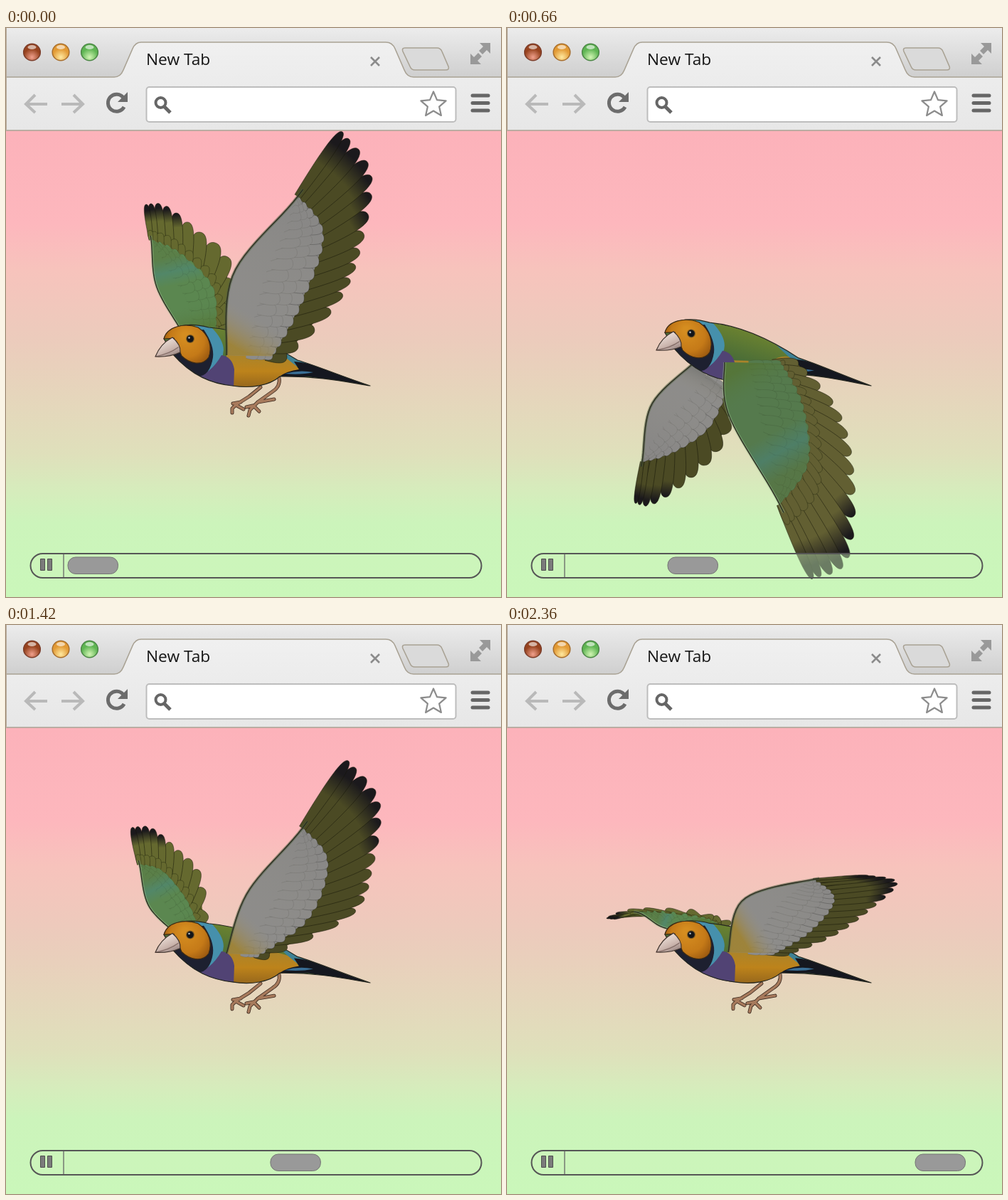
Write an HTML page with a canvas that moves like this. It is 696 by 800 pixels and loops after 2.52 s.

```html
<!DOCTYPE html>
<html lang="en">
<head>
<meta charset="utf-8">
<title>Flying finch</title>
<style>
html, body { margin: 0; width: 100%; height: 100%; overflow: hidden; }
#stage {
  position: relative; width: 696px; height: 800px; overflow: hidden;
  background: linear-gradient(#fcb2ba 143px, #fdb7bd 275px, #f7c3bc 340px, #eccbbc 435px, #dfe0bb 600px, #d6ecbc 650px, #ccf4bb 695px, #caf7ba);
}
canvas, svg { position: absolute; left: 0; top: 0; display: block; }
text { font: 22.7px "Open Sans", "Noto Sans", sans-serif; fill: #161616; }
</style>
</head>
<body>
<div id="stage">
<canvas id="sky" width="696" height="800"></canvas>
<svg width="696" height="800" viewBox="0 0 696 800" fill="none">
  <defs>
    <linearGradient id="bar" x2="0" y2="1"><stop stop-color="#ececec"/><stop offset="1" stop-color="#cfcfcf"/></linearGradient>
    <linearGradient id="tab" x2="0" y2="1"><stop stop-color="#f0f0f0"/><stop offset="1" stop-color="#e7e7e7"/></linearGradient>
    <radialGradient id="red" cy=".8"><stop stop-color="#f0a08c"/><stop offset="1" stop-color="#97431f"/></radialGradient>
    <radialGradient id="amber" cy=".8"><stop stop-color="#ffe9a0"/><stop offset="1" stop-color="#e29a35"/></radialGradient>
    <radialGradient id="green" cy=".8"><stop stop-color="#d2f5b4"/><stop offset="1" stop-color="#5fb553"/></radialGradient>
  </defs>
  <path fill="url(#bar)" d="M0 0H696V69H0z"/>
  <path fill="#e9e9e9" d="M0 69H696V143H0z"/>
  <path fill="url(#tab)" stroke="#a9a294" stroke-width="1.6" d="M-2 69H152Q161 69 165 59L178 29Q182 20 190 20H534Q543 20 547 29L560 59Q564 69 573 69H698V144H-2z"/>
  <path stroke="#b5a896" d="M.5 0V143"/>
  <g stroke-width="1.5">
    <circle cx="36.5" cy="34" r="11.8" fill="url(#red)" stroke="#7c3e2b"/>
    <circle cx="77" cy="34" r="11.8" fill="url(#amber)" stroke="#a86f2e"/>
    <circle cx="117.5" cy="34" r="11.8" fill="url(#green)" stroke="#4c8746"/>
  </g>
  <g fill="#fff" opacity=".6"><ellipse cx="36.5" cy="27" rx="6" ry="3"/><ellipse cx="77" cy="27" rx="6" ry="3"/><ellipse cx="117.5" cy="27" rx="6" ry="3"/></g>
  <text x="197" y="52">New Tab</text>
  <path stroke="#8b8b8b" stroke-width="2.6" d="M513 41l12 12m0-12l-12 12"/>
  <path fill="#dadada" stroke="#a9a294" stroke-width="1.6" d="M561 28H606Q611 28 613 33L622 54Q624 59 618 59H575Q570 59 568 54L558 33Q556 28 561 28z"/>
  <path fill="#999" d="M666 21H681V36L676 31 670 37 665 32 671 26zM653 36V51H668L663 46 669 40 664 35 658 41z"/>
  <g stroke="#b9b9b9" stroke-width="4"><path d="M58 107H29m12-13L28 107l13 12"/><path d="M78 107h29m-12-13l13 13-13 12"/></g>
  <path stroke="#6c6c6c" stroke-width="5" d="M165 98A12 12 0 1 0 166 111"/>
  <path fill="#6c6c6c" d="M171 90V104H157z"/>
  <rect x="197.500" y="83" width="435" height="49" rx="4" fill="#fff" stroke="#bdbdbd" stroke-width="2"/>
  <circle cx="217.500" cy="105" r="7" stroke="#666" stroke-width="4"/>
  <path stroke="#666" stroke-width="5" d="M222 110l9 9"/>
  <path id="star" fill="#fff" stroke="#8c8c8c" stroke-width="2.2" stroke-linejoin="round"/>
  <path stroke="#666" stroke-width="5" stroke-linecap="round" d="M656 95h22M656 105.500h22M656 116h22"/>
  <rect x="34.500" y="739" width="634" height="34" rx="17" fill="#cdf4bb" fill-opacity=".45" stroke="#565656" stroke-width="2"/>
  <path stroke="#666" stroke-width="1.3" d="M81 740V772"/>
  <path fill="#7b7b7b" stroke="#4e4e4e" d="M48.500 746.500h6v16h-6zM58.500 746.500h6v16h-6z"/>
  <rect id="thumb" x="87" y="744" width="70.500" height="23.500" rx="11" fill="#999" stroke="#757575"/>
</svg>
</div>
<script>
const ctx = document.getElementById('sky').getContext('2d');
const thumb = document.getElementById('thumb');
const LOOP = 2520, LAST = 2360, STEP = 20, BEAT = 1223, START = 87, SPEED = 0.2111;

document.getElementById('star').setAttribute('d', 'M' + Array.from({ length: 10 }, (_, i) => {
  const a = i * Math.PI / 5 - Math.PI / 2, r = i % 2 ? 8.5 : 18.5;
  return (601 + r * Math.cos(a)).toFixed(1) + ' ' + (108 + r * Math.sin(a)).toFixed(1);
}).join('L') + 'z');

const slide = [[0, 87], [300, 150], [660, 226], [1160, 316], [1700, 432], [2040, 509], [2360, 574]];
const beats = [0, 300, 412, 660, 777, 930, 1085];
const bob = [[0], [-5], [-7], [-9], [-8], [-5], [-2]];

// Each pose: four points of the leading edge, four of the trailing edge, two of the covert hem.
const nearPoses = [
  [310,460, 320,345, 410,237, 473,146, 513,203, 500,302, 470,380, 395,462, 445,290, 415,385],
  [310,464, 365,446, 428,415, 502,351, 549,383, 538,433, 505,466, 345,467, 461,437, 440,464],
  [308,463, 328,528, 412,570, 502,594, 543,585, 515,552, 478,518, 398,468, 448,545, 425,500],
  [306,470, 312,545, 383,670, 429,775, 478,750, 487,640, 468,545, 410,472, 422,612, 414,530],
  [308,470, 326,560, 372,655, 396,772, 452,745, 483,650, 482,550, 405,470, 407,605, 412,530],
  [309,465, 350,450, 440,470, 505,570, 520,560, 530,520, 490,490, 400,466, 460,490, 435,475],
  [311,460, 332,386, 430,357, 508,351, 549,361, 513,397, 462,434, 397,462, 459,385, 425,430]
];
const farPoses = [
  [243,420, 211,362, 204,298, 197,248, 222,249, 263,280, 314,328, 312,425, 245,318, 290,365],
  [245,466, 190,464, 160,436, 140,402, 158,401, 183,409, 210,418, 250,440, 180,428, 205,442],
  [255,468, 205,487, 170,527, 149,536, 165,536, 220,537, 280,530, 325,505, 205,533, 262,520],
  [260,473, 203,530, 190,610, 181,669, 203,671, 250,640, 300,590, 325,520, 232,597, 283,562],
  [252,472, 195,525, 182,603, 178,683, 199,687, 245,645, 290,582, 328,520, 226,592, 285,545],
  [247,455, 205,470, 160,490, 140,560, 150,565, 190,530, 260,500, 320,470, 195,508, 255,490],
  [240,430, 215,423, 182,403, 150,412, 141,410, 180,399, 260,403, 315,418, 215,404, 275,412]
];

const mix = (a, b, k) => [a[0] + (b[0] - a[0]) * k, a[1] + (b[1] - a[1]) * k];
const clamp = v => Math.min(1, Math.max(0, v));

// Cubic through the keyed poses, wrapping at the end of the wing beat.
function pose(keys, t) {
  const n = beats.length;
  const when = i => beats[(i + n) % n] + Math.floor(i / n) * BEAT;
  const key = i => keys[(i + n) % n];
  let i = n - 1;
  while (beats[i] > t) i--;
  const t0 = when(i), d = when(i + 1) - t0, u = (t - t0) / d;
  return key(i).map((a, c) => {
    const b = key(i + 1)[c];
    const m = (b - key(i - 1)[c]) / (when(i + 1) - when(i - 1)) * d;
    const q = (key(i + 2)[c] - a) / (when(i + 2) - t0) * d;
    return a + u * (m + u * (3 * (b - a) - 2 * m - q + u * (2 * (a - b) + m + q)));
  });
}

// Point at u (0..1) on a smooth curve through pts.
function at(pts, u) {
  const n = pts.length - 1, s = clamp(u) * n, i = Math.min(n - 1, Math.floor(s)), f = s - i;
  const b = pts[i], c = pts[i + 1], a = pts[i - 1] || b, d = pts[i + 2] || c;
  return [0, 1].map(k => b[k] + f / 2 * (c[k] - a[k]
    + f * (2 * a[k] - 5 * b[k] + 4 * c[k] - d[k] + f * (3 * (b[k] - c[k]) + d[k] - a[k]))));
}
const trace = (fn, n = 24) => Array.from({ length: n + 1 }, (_, i) => fn(i / n));

function line(pts) {
  ctx.beginPath();
  pts.forEach(p => ctx.lineTo(p[0], p[1]));
}

function blade(a, b, h, fill, edge) {
  const dx = b[0] - a[0], dy = b[1] - a[1], len = Math.hypot(dx, dy) || 1;
  const side = (p, k) => [p[0] - dy / len * h * k, p[1] + dx / len * h * k];
  const m = mix(a, b, 0.65);
  ctx.beginPath();
  ctx.moveTo(...side(a, -0.6));
  ctx.bezierCurveTo(...side(m, -1.1), ...side(b, -1.1), ...b);
  ctx.bezierCurveTo(...side(b, 1.1), ...side(m, 1.1), ...side(a, 0.6));
  ctx.fillStyle = fill;
  ctx.fill();
  ctx.strokeStyle = edge;
  ctx.stroke();
}

// A row of n blades between two curves, drawn from the body outwards.
function row(n, from, to, paint, edge) {
  for (let i = n - 1; i >= 0; i--) {
    const u = i / (n - 1), a = from(u), b = to(u);
    const u0 = clamp(u - 1 / n), u1 = clamp(u + 1 / n), p = to(u0), q = to(u1);
    const dx = b[0] - a[0], dy = b[1] - a[1], len = Math.hypot(dx, dy) || 1;
    const gap = Math.abs(dx * (q[1] - p[1]) - dy * (q[0] - p[0])) / len / ((u1 - u0) * n);
    blade(a, b, gap * 0.58 + 1.2, paint(u, a, b), edge);
  }
}

function wing(p, top, n, far) {
  const pts = Array.from({ length: 10 }, (_, i) => [p[2 * i], p[2 * i + 1]]);
  const [l0, l1, l2, l3, t1, t2, t3, t4, k1, k2] = pts;
  const end = mix(t4, l0, 0.25);
  const edge = u => at([l0, l1, l2, l3], u);
  const lead = u => edge((1 - u) * 2 / 3);
  const hem = u => at([l2, k1, k2, end], u);
  const tips = u => at([l3, t1, t2, t3, t4], u);
  const quill = top ? (far ? '#65692f' : '#625f32') : '#4b4a24';
  const cover = top ? (far ? '#5b8750' : '#557a4d') : '#8d8c8a';
  ctx.lineWidth = 0.9;

  line([...trace(hem), ...trace(u => mix(hem(1 - u), tips(1 - u), 0.75))]);
  ctx.fillStyle = quill;
  ctx.fill();
  row(n, u => mix(hem(u), lead(u), 0.15), tips, (u, a, b) => {
    if (u > 0.42) return quill;
    const g = ctx.createLinearGradient(...a, ...b);
    g.addColorStop(0.5 + u * 0.5, quill);
    g.addColorStop(0.82 + u * 0.4, '#1b191c');
    return g;
  }, 'rgba(20,20,8,.55)');
  if (top) row(n + 3, hem, u => mix(hem(u), tips(u), 0.27), () => quill, 'rgba(25,30,10,.4)');

  const patch = () => line([...trace(u => edge(u * 2 / 3)), ...trace(hem)]);
  patch();
  ctx.fillStyle = cover;
  ctx.fill();
  for (const r of [0, 0.16, 0.32]) {
    row(n + 2, u => mix(hem(u), lead(u), r + 0.25), u => mix(hem(u), lead(u), r - 0.02),
      () => cover, r || top ? 'rgba(30,35,25,.12)' : 'rgba(30,30,30,.35)');
  }
  const g = ctx.createLinearGradient(...mix(l0, end, 0.5), ...k1);
  if (top) {
    g.addColorStop(0, 'rgba(85,115,45,.6)');
    g.addColorStop(0.3, 'rgba(85,125,75,0)');
    g.addColorStop(0.62, 'rgba(65,135,150,0)');
    g.addColorStop(0.8, 'rgba(65,135,150,.35)');
    g.addColorStop(1, 'rgba(90,110,55,.3)');
  } else {
    g.addColorStop(0, far ? 'rgba(110,110,105,.5)' : 'rgba(160,130,45,.85)');
    g.addColorStop(0.26, 'rgba(150,145,130,0)');
    g.addColorStop(1, 'rgba(120,118,118,.2)');
  }
  patch();
  ctx.fillStyle = g;
  ctx.fill();

  const rim = trace(u => edge(u * 0.7));
  line(rim);
  ctx.lineWidth = 4;
  ctx.strokeStyle = top ? 'rgba(150,190,140,.4)' : 'rgba(75,95,60,.5)';
  ctx.stroke();
  line(rim);
  ctx.lineWidth = 1.4;
  ctx.strokeStyle = '#2b2c20';
  ctx.stroke();
}

const shape = new Path2D('M222 437C228 419 255 413 285 421C330 424 375 445 410 467C440 476 470 489 512 503C480 498 440 489 385 490C370 503 345 507 318 503C290 500 262 490 234 458z');
const chest = [
  ['M268 415L288 420Q313 445 303 464Q290 482 276 497L240 470z', '#4690ac'],
  ['M303 460Q318 462 321 480L320 508L262 493Q288 487 303 460z', '#514374'],
  ['M230 452Q250 480 270 490Q287 489 291 463Q293 446 278 424L240 430z', '#1d2030']
].map(([d, c]) => [new Path2D(d), c]);
const rump = new Path2D('M378 449L410 464L436 475L412 478Q395 466 378 449z');
const tail = new Path2D('M405 469Q425 470 445 479Q480 487 512 503Q470 497 425 490L383 491Q395 482 412 480z');
const tailBlue = new Path2D('M392 486Q412 480 432 484Q415 488 392 486z');
const head = new Path2D('M222 437C226 420 250 414 270 421C287 432 290 450 285 463C276 476 258 472 247 461L236 436z');
const beak = new Path2D('M210 462Q217 444 234 435Q246 445 245 456Q230 463 210 462z');
const mouth = new Path2D('M210 462Q230 458 242 449');
const legs = new Path2D('M358 505L342 518L323 530L318 535V541M323 530L334 536M330 526L319 528M384 492Q386 504 375 511L354 526L343 537L341 545M354 526L377 522M348 531L356 539M347 531L338 533');

function paint(path, fill, edge) {
  ctx.fillStyle = fill;
  ctx.fill(path);
  if (edge) { ctx.strokeStyle = edge; ctx.stroke(path); }
}

function body(dy, under) {
  ctx.save();
  ctx.transform(1, -dy / 300, 0, 1, 0, dy * 512 / 300);
  ctx.lineCap = ctx.lineJoin = 'round';
  for (const [w, c] of [[5, '#3c2a20'], [3.4, '#a77a5c']]) {
    ctx.lineWidth = w;
    ctx.strokeStyle = c;
    ctx.stroke(legs);
  }
  ctx.save();
  ctx.clip(shape);
  const back = ctx.createLinearGradient(330, 420, 315, 475);
  back.addColorStop(0, '#71862f');
  back.addColorStop(1, '#466a38');
  paint(shape, back);
  const y = under ? 459 : 473;
  const gold = ctx.createLinearGradient(0, y, 0, 506);
  gold.addColorStop(0, '#a9842b');
  gold.addColorStop(0.5, '#bd831b');
  gold.addColorStop(1, '#95661c');
  paint(new Path2D(`M310 ${y}L372 ${y}Q385 462 402 467L412 480L385 493L350 512L310 508z`), gold);
  paint(rump, '#3f8295');
  paint(tail, '#15171f');
  paint(tailBlue, '#3b6f96');
  chest.forEach(([d, c]) => paint(d, c));
  ctx.restore();
  ctx.lineWidth = 1.2;
  ctx.strokeStyle = '#24261f';
  ctx.stroke(shape);
  const glow = ctx.createRadialGradient(252, 432, 4, 256, 442, 38);
  glow.addColorStop(0, '#d58d20');
  glow.addColorStop(0.6, '#c57a18');
  glow.addColorStop(1, '#93530f');
  paint(head, glow, '#3c2a14');
  const horn = ctx.createLinearGradient(220, 438, 232, 464);
  horn.addColorStop(0, '#efe3dc');
  horn.addColorStop(0.6, '#cbb5ad');
  horn.addColorStop(1, '#94817f');
  paint(beak, horn, '#40342e');
  ctx.strokeStyle = 'rgba(90,65,60,.6)';
  ctx.stroke(mouth);
  for (const [x, y, r, c] of [[259, 437, 6, '#7d5a22'], [259, 437, 4.8, '#12151a'], [257.5, 435.5, 1.3, '#b9c3cc']]) {
    ctx.beginPath();
    ctx.arc(x, y, r, 0, 7);
    ctx.fillStyle = c;
    ctx.fill();
  }
  ctx.restore();
}

// Which face of the wing is turned to the viewer.
const raised = p => (p[4] - p[0]) * (p[13] - p[1]) > (p[5] - p[1]) * (p[12] - p[0]);

function frame() {
  const t = Math.min(LAST, Math.floor(performance.now() % LOOP / STEP) * STEP);
  const i = Math.max(1, slide.findIndex(k => k[0] >= t));
  const [t0, x0] = slide[i - 1], [t1, x1] = slide[i];
  const x = x0 + (x1 - x0) * (t - t0) / (t1 - t0);
  thumb.setAttribute('x', x.toFixed(1));

  const phase = (x - START) / SPEED % BEAT;
  const near = pose(nearPoses, phase), far = pose(farPoses, phase);
  const up = raised(near);
  ctx.clearRect(0, 0, 696, 800);
  wing(far, raised(far), 12, true);
  body(pose(bob, phase)[0], up);
  wing(near, !up, 16, false);
  requestAnimationFrame(frame);
}
frame();
</script>
</body>
</html>
```
